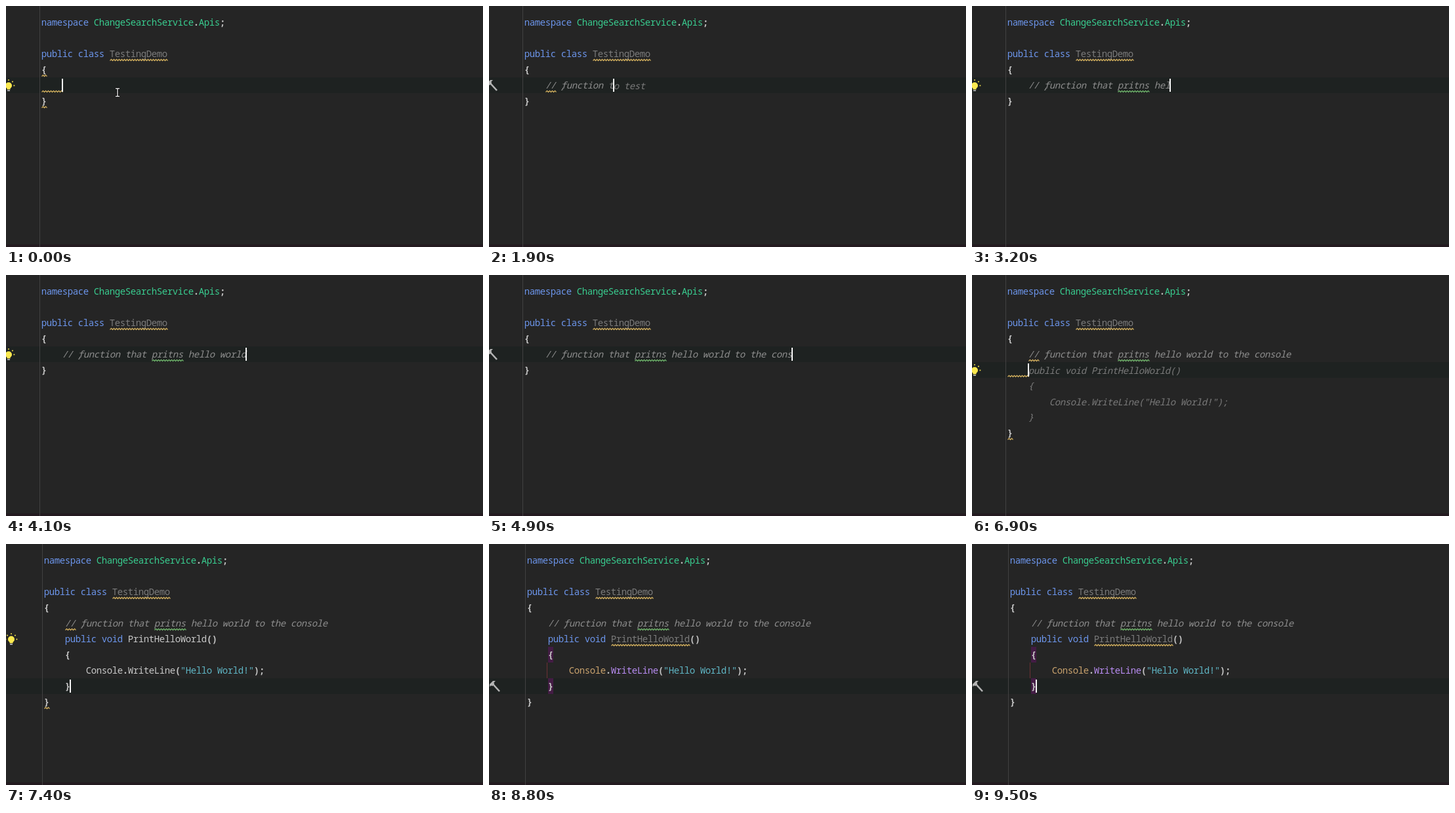
Write an HTML page with a canvas that moves like this. It is 727 by 368 pixels and loops after 9600 ms.

```html
<!DOCTYPE html>
<html lang="en">
<head>
<meta charset="utf-8">
<title>Code completion</title>
<style>
html, body { margin: 0; width: 100%; height: 100%; overflow: hidden; background: #252525; }
canvas { display: block; width: 727px; height: 368px; }
</style>
</head>
<body>
<canvas id="stage"></canvas>
<script>
const W = 727, H = 368, LOOP = 9600, CELL = 8, ROW = 24;
const canvas = document.getElementById('stage');
const ctx = canvas.getContext('2d');
const dpr = window.devicePixelRatio || 1;
canvas.width = W * dpr;
canvas.height = H * dpr;

const FONT = '14px "Noto Sans Mono", "DejaVu Sans Mono", monospace';
const C = {
  bg: '#252525', band: '#1e2221', gutter: '#414141', foot: '#241b20',
  key: '#6c95eb', type: '#39cc8f', plain: '#c8c8c8', punct: '#c4c4c4',
  dim: '#7b7b7b', comment: '#8e8e8e', ghost: '#7a7a7a',
  text: '#5fb5c4', call: '#b88cf2', owner: '#c9a26d',
  warn: '#cdab5c', typo: '#6cae68', brace: '#431c44', guide: '#6a3035',
  bulb: '#fce94f', tool: '#b4b4b4'
};

const COMMENT = '// function that pritns hello world to the console';
const GHOST = [
  [4, 'public void PrintHelloWorld()', 1],
  [4, '{', 0],
  [8, 'Console.WriteLine("Hello World!");', 1],
  [4, '}', 0]
];

// Typing schedule: [time, characters typed]
const keys = [[500, 1], [700, 2], [1000, 3], [1100, 4], [1200, 5], [1300, 7],
  [1500, 8], [1600, 9], [1700, 11], [1800, 12], [1900, 13]];
for (let i = 0; i < 14; i++) keys.push([2000 + i * 100, 15 + i]);
keys.push([3500, 29], [3700, 31]);
for (let i = 1; i <= 10; i++) keys.push([3800 + i * 100, 31 + Math.round(i * 1.4)]);
keys.push([4900, 47], [5100, 49], [5200, 50]);

let left = 54;
const colX = col => left + col * CELL;
const baseY = row => 30 + row * ROW;
const bandY = row => 13 + row * ROW;
const within = (t, a, b) => t >= a && t < b;

function typed(t) {
  let n = 0;
  for (const [at, count] of keys) if (t >= at) n = count;
  return n;
}

function rect(x, y, w, h, color) {
  ctx.fillStyle = color;
  ctx.fillRect(x, y, w, h);
}

function path(points, color, width) {
  ctx.strokeStyle = color;
  ctx.lineWidth = width;
  ctx.beginPath();
  points.forEach(([x, y], i) => i ? ctx.lineTo(x, y) : ctx.moveTo(x, y));
  ctx.stroke();
}

// Every glyph is centred in its cell of the editor's fixed grid.
function write(row, col, str, color, style = '', dy = 0) {
  ctx.font = style + ' ' + FONT;
  ctx.fillStyle = color;
  ctx.textAlign = 'center';
  [...str].forEach((ch, i) => ctx.fillText(ch, colX(col + i + 0.5), baseY(row) + dy));
}

const bold = (row, col, str) => write(row, col, str, C.punct, 'bold');

function wave(row, col, len, color = C.warn) {
  const x = colX(col), y = baseY(row) + 3.5, pts = [];
  for (let i = 0; i <= len * CELL; i += 2) pts.push([x + i + 0.5, y + (i % 4 ? 0 : 2)]);
  path(pts, color, 1.3);
}

function comment(n) {
  write(4, 4, COMMENT.slice(0, n), C.comment, 'italic');
  if (n > 3) {
    // descending tail of the cursive f
    const x = colX(7), y = baseY(4);
    path([[x + 2.6, y - 1], [x + 2, y + 1.8], [x + 0.2, y + 2.5]], C.comment, 1.2);
  }
}

function bulb(row) {
  const x = left - 50, y = baseY(row) - 4.5;
  ctx.fillStyle = C.bulb;
  ctx.beginPath();
  ctx.arc(x, y, 5, 0, Math.PI * 2);
  ctx.fill();
  rect(x - 2.5, y + 3, 5, 3, C.bulb);
  rect(x - 2, y + 7, 4, 1.5, '#c8c8c8');
  for (let a = 0; a <= 4; a++) {
    const r = a * Math.PI / 4, dx = Math.cos(r), dy = -Math.sin(r);
    path([[x + dx * 7.5, y + dy * 7.5], [x + dx * 9.3, y + dy * 9.3]], C.bulb, 1.6);
  }
}

function hammer(row) {
  const x = left - 54, y = baseY(row) - 5;
  path([[x + 2, y - 3], [x + 12, y + 8]], C.tool, 2.6);
  ctx.fillStyle = C.tool;
  ctx.beginPath();
  [[-3, -3], [2, -8], [6, -8], [3.5, -5.5], [4, -3], [1, 0], [-1, -1], [-3, 1]]
    .forEach(([a, b], i) => i ? ctx.lineTo(x + a, y + b) : ctx.moveTo(x + a, y + b));
  ctx.fill();
}

function caret(row, col) {
  rect(colX(col) - 1, bandY(row) + 2, 2, 20, '#f4f4f4');
}

function pointer(x, y) {
  const marks = [[[x - 3, y - 6], [x + 3, y - 6]], [[x, y - 6], [x, y + 6]], [[x - 3, y + 6], [x + 3, y + 6]]];
  marks.forEach(m => path(m, '#000', 3.4));
  marks.forEach(m => path(m, '#fff', 1.3));
}

function header() {
  write(0, 0, 'namespace', C.key);
  write(0, 10, 'ChangeSearchService', C.type);
  bold(0, 29, '.');
  write(0, 30, 'Apis', C.type);
  bold(0, 34, ';');
  write(2, 0, 'public class', C.key);
  write(2, 13, 'TestingDemo', C.dim);
  wave(2, 13, 11);
  bold(3, 0, '{');
}

function method(t) {
  const ready = t >= 7600;
  write(5, 4, 'public void', C.key);
  write(5, 16, 'PrintHelloWorld', t >= 7900 ? C.dim : ready ? C.call : C.plain);
  bold(5, 31, '()');
  bold(6, 4, '{');
  write(7, 8, 'Console', ready ? C.owner : C.plain);
  bold(7, 15, '.');
  write(7, 16, 'WriteLine', ready ? C.call : C.plain);
  bold(7, 25, '(');
  write(7, 26, '"Hello World!"', C.text);
  bold(7, 40, ');');
  bold(8, 4, '}');
  if (ready) wave(5, 16, 15);
}

function draw(t) {
  const done = t >= 7400, entered = t >= 6200, offered = within(t, 6900, 7400);
  const n = typed(t);
  const row = done ? 8 : entered ? 5 : 4;
  const endRow = t >= 6900 ? 9 : entered ? 6 : 5;
  left = done ? 58 : 54;

  ctx.setTransform(dpr, 0, 0, dpr, 0, 0);
  rect(0, 0, W, H, C.bg);
  rect(0, bandY(row), W, ROW, C.band);
  rect(0, 364, W, 4, C.foot);
  rect(left - 3, 0, 1, H, C.gutter);
  if (t >= 7500) {
    rect(colX(4), bandY(6), CELL, ROW, C.brace);
    rect(colX(4), bandY(8), CELL, ROW, C.brace);
    rect(colX(4) - 2, bandY(7), 1, ROW, C.guide);
  }

  header();
  comment(n);
  bold(endRow, 0, '}');

  if (t < 1100) wave(3, 0, 1);
  if (t < 1100 || within(t, 6600, 7600)) wave(endRow, 0, 1);
  if (t < 700) wave(4, 0, 4);
  if (within(t, 1200, 2200) || within(t, 6600, 7600)) wave(4, 4, 2);
  if (t >= 3000) wave(4, 21, 6, C.typo);
  if (within(t, 6600, 7400)) wave(5, 0, 4);

  if (within(t, 1800, 2000)) write(4, 4 + n, 'to test'.slice(n - 12), C.ghost, 'italic', 1);
  if (offered) GHOST.forEach(([col, str, dy], i) => write(5 + i, col, str, C.ghost, 'italic', dy));
  if (done) method(t);

  if (t < 1200 || within(t, 3000, 4300)) bulb(4);
  else if (t < 6200) hammer(4);
  else if (within(t, 6600, 7500)) bulb(5);
  else if (t >= 7600) hammer(8);

  const hidden = within(t, 6000, 6200) || within(t, 8800, 9300);
  if (!hidden) caret(row, done ? 5 : entered ? 4 : 4 + n);
  if (t < 700) pointer(170, 132);
}

const start = performance.now();
function tick() {
  draw((performance.now() - start) % LOOP);
  requestAnimationFrame(tick);
}
tick();
</script>
</body>
</html>
```
